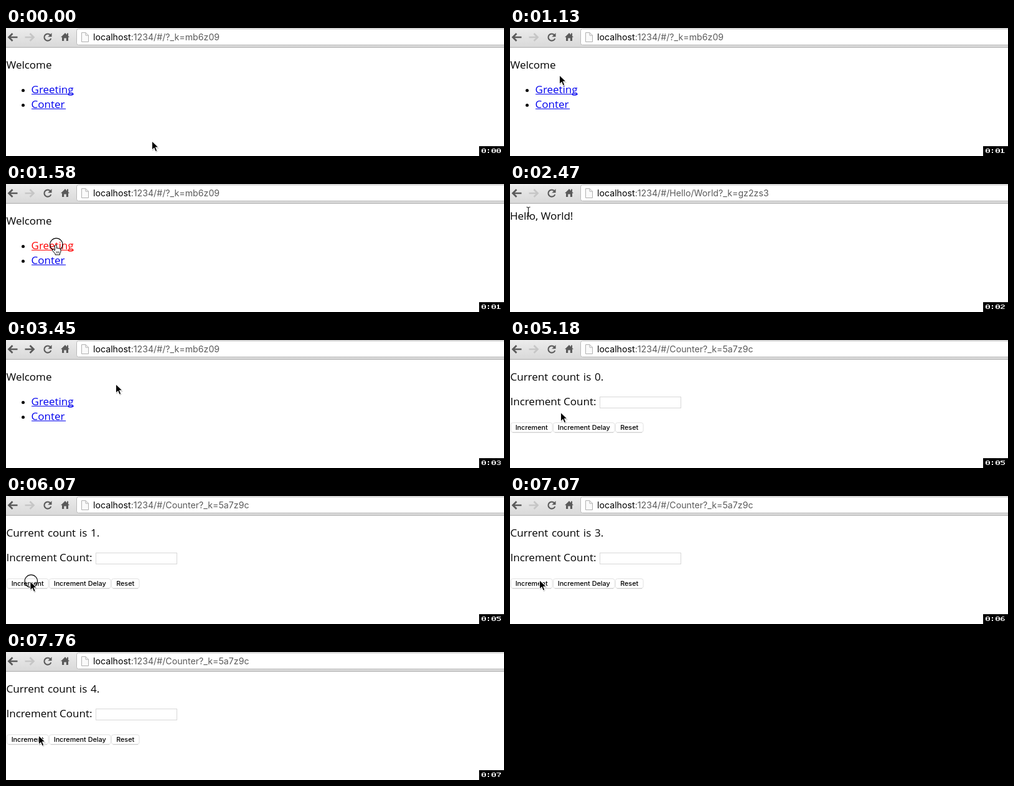
An HTML page that plays this animation: 800x208 px, repeating every 8000 ms.

```html
<!DOCTYPE html>
<html lang="en">
<head>
<meta charset="utf-8">
<title>Router demo</title>
<style>
html, body { margin: 0; width: 100%; height: 100%; overflow: hidden; background: #fff; }
svg { display: block; width: 800px; height: 208px; }
text { white-space: pre; }
.page { font: 17px "Open Sans", "Noto Sans", sans-serif; }
#count { word-spacing: 1.3px; }
.link { fill: #00e; }
.link rect { height: 1px; }
.url { font: 14.2px Inter, "Liberation Sans", sans-serif; fill: #5a5a5a; }
.button text { font: 500 10.8px Inter, "Liberation Sans", sans-serif; text-anchor: middle; }
.button rect { fill: #fff; stroke: #e2e2e2; }
.button.pressed rect { fill: #3b8df5; stroke: #2f78dc; }
.button.pressed text { fill: #fff; }
.icon { fill: none; stroke: #5a5a5a; stroke-width: 2.7; }
.reload { stroke-width: 2.1; }
.digit { fill: none; stroke: #fff; }
</style>
</head>
<body>
<svg viewBox="0 0 800 208">
  <defs>
    <linearGradient id="chrome" x2="0" y2="1">
      <stop stop-color="#ececec"/><stop offset="1" stop-color="#d9d9d9"/>
    </linearGradient>
  </defs>
  <rect width="800" height="208" fill="#fff"/>

  <rect width="800" height="31" fill="url(#chrome)"/>
  <rect y="31" width="800" height="1" fill="#ababab"/>
  <rect x="113.5" y="1.5" width="700" height="26" rx="3" fill="#fff" stroke="#b9b9b9"/>
  <path class="icon" d="M18.5 15H5M10.5 9L4.5 15L10.5 21"/>
  <path class="icon" id="forward" d="M30.5 15H44M38.5 9L44.5 15L38.5 21"/>
  <path class="icon reload" d="M71.3 11.4A5.6 5.6 0 1 0 72.3 17"/>
  <path d="M73.5 8V14.2H67.3Z" fill="#5a5a5a"/>
  <path d="M95 8L102 15H100V21H96.8V16.5H93.2V21H90V15H88L95 8ZM98 8.5H100V13L98 11Z" fill="#5a5a5a"/>
  <path d="M121.5 7.5H128L132.5 12V22.5H121.5ZM128 7.5V12H132.5" fill="#fafafa" stroke="#b0b0b0"/>
  <text class="url" x="140" y="20"><tspan fill="#000">localhost</tspan><tspan id="path"></tspan></text>

  <g class="page">
    <g id="home">
      <text x="0.5" y="66">Welcome</text>
      <circle cx="27.5" cy="101.5" r="2.5"/>
      <circle cx="27.5" cy="125.5" r="2.5"/>
      <g class="link" id="greeting">
        <text x="40.5" y="106">Greeting</text><rect x="41" y="107" width="68"/>
      </g>
      <g class="link" id="conter">
        <text x="40.5" y="130">Conter</text><rect x="41" y="131" width="55"/>
      </g>
    </g>
    <text id="hello" x="0" y="58">Hello, World!</text>
    <g id="counter">
      <text id="count" x="0.5" y="66"></text>
      <text x="0.5" y="106">Increment Count:</text>
      <rect x="144.5" y="92.5" width="130" height="18" fill="#fff" stroke="#d8d8d8"/>
      <g id="buttons"></g>
    </g>
  </g>

  <rect x="760" y="192" width="40" height="16"/>
  <path class="digit" id="minute" transform="translate(764 196)"/>
  <path d="M774 197h2v2h-2zM774 201h2v2h-2z" fill="#fff"/>
  <path class="digit" id="tens" transform="translate(780 196)"/>
  <path class="digit" id="second" transform="translate(788 196)"/>

  <g id="cursor">
    <circle id="ring" r="10.2" cx="0.8" cy="0.3" fill="none" stroke="#000" stroke-width="1.1"/>
    <g id="arrow" transform="translate(-.6 .5) scale(1.06)">
      <path d="M.5 1.5V15.5L3.8 12.5L6 17.5L8.8 16.3L6.6 11.5H11Z" fill="#000" opacity=".25"/>
      <path d="M0 0V14L3.3 11L5.4 16.2L8 15.1L5.8 10H10.3Z" fill="#000" stroke="#fff"/>
    </g>
    <path id="beam" d="M-3-7.5Q0-7.5 0-5.5Q0-7.5 3-7.5M0-5.5V5.5M-3 7.5Q0 7.5 0 5.5Q0 7.5 3 7.5M-1.5 2H1.5" fill="none" stroke="#222" stroke-width="1.2"/>
    <g id="hand" stroke="#000" stroke-linejoin="round">
      <path d="M-1.5 10V1.8Q0 0 1.5 1.8V6.5Q3 5 4 6.8Q5.6 5.7 6.3 7.5Q8 7 8 9V12L6.5 15V17H-1V15.5L-5.5 10Q-6 8-4 8.3Z" fill="#fff"/>
      <path d="M1 11.5V14.5M3 11.5V14.5M5 11.5V14.5" stroke-width=".8"/>
    </g>
  </g>
</svg>
<script>
const LOOP = 8000;
const $ = id => document.getElementById(id);
const show = (id, on) => $(id).setAttribute('display', on ? 'inline' : 'none');
const lastAt = (list, t, time = x => x) => list.findLastIndex(x => time(x) <= t);

const ticks = [0, 590, 740, 890, 1030, 1130, 1280, 1430, 1580, 1730,
  2470, 2620, 2770, 2920, 3060, 3160, 3300, 3450, 3600, 3750, 3900, 4050, 4150, 4300, 4440, 4590, 4740,
  5480, 5630, 5780, 5920, 6070, 6220, 6320, 6470, 6620, 6770, 6920, 7060, 7170, 7320, 7470, 7620, 7760];
const seconds = [0, 1030, 2020, 3060, 4150, 5180, 6220, 7170];
const counts = [0, 6070, 6470, 7060, 7760];
const clicks = [1580, 2920, 4590, 6070, 6470, 6920, 7620];
const presses = [6920, 7620];

// time, x, y, pointer shape
const moves = [
  [0, 235, 183, 'arrow'], [480, 235, 183, 'arrow'], [1130, 80, 76, 'arrow'],
  [1430, 80, 98, 'hand'], [1730, 80, 98, 'arrow'], [2460, 80, 98, 'arrow'],
  [2470, 29.5, 45, 'beam'], [2620, 16, 24, 'arrow'], [2770, 9, 14, 'arrow'],
  [3060, 9, 14, 'arrow'], [3450, 177, 71, 'arrow'], [3600, 174, 72, 'arrow'],
  [4300, 84, 112, 'hand'], [4440, 82, 117, 'hand'], [4740, 82, 117, 'arrow'],
  [5400, 82, 117, 'arrow'], [5920, 39.5, 138, 'arrow'], [6470, 39.5, 138, 'arrow'],
  [7470, 53, 135, 'arrow']
];

// Each stroke is repeated one pixel to the right, so uprights are two wide.
const glyphs = [
  'M1.5 .5H4.5L5.5 1.5V5.5L4.5 6.5H1.5L.5 5.5V1.5ZM2.5 4L3.5 3',
  'M1 1.5H2.5V0V6.5M.5 6.5H5.5',
  'M.5 2V1.5L1.5 .5H4.5L5.5 1.5V2.5L.5 5.5V6.5H5.5',
  'M.5 1.5L1.5 .5H4.5L5.5 1.5V2.5L4.5 3.5H2.5M4.5 3.5L5.5 4.5V5.5L4.5 6.5H1.5L.5 5.5',
  'M4.5 7V.5L.5 4.5H6',
  'M6 .5H.5V2.5H4.5L5.5 3.5V5.5L4.5 6.5H1.5L.5 5.5',
  'M5 .5H2.5L.5 2.5V5.5L1.5 6.5H4.5L5.5 5.5V4.5L4.5 3.5H.5',
  'M0 .5H5.5V2L3 4.5V7'
];
const setDigit = (id, n) =>
  $(id).setAttribute('d', glyphs[n] + glyphs[n].replace(/M([\d.]+)/g, (_, x) => 'M' + (+x + 1))
    .replace(/([HL])([\d.]+)/g, (_, c, x) => c + (+x + 1)).replace(/V([\d.]+)/g, 'V$1'));

$('buttons').innerHTML = [['Increment', 1, 67], ['Increment Delay', 69, 99], ['Reset', 169, 45]]
  .map(([label, x, w]) => `<g class="button">
    <rect x="${x + .5}" y="134.5" width="${w - .5}" height="15.5" rx="3"/>
    <path d="M${x + 3} 150.3h${w - 5}" stroke="#c4c4c4" stroke-width=".8"/>
    <text x="${x + w / 2 + .2}" y="146">${label}</text></g>`).join('');
const increment = $('buttons').firstElementChild;

function pointer(t) {
  const i = lastAt(moves, t, m => m[0]);
  const a = moves[i], b = moves[i + 1] || a;
  const u = b === a ? 0 : (t - a[0]) / (b[0] - a[0]);
  const k = u * u * (3 - 2 * u);
  return { x: a[1] + (b[1] - a[1]) * k, y: a[2] + (b[2] - a[2]) * k, shape: a[3] };
}

function render(t) {
  const tick = ticks[lastAt(ticks, t)];
  const page = t < 1730 ? 'home' : t < 3060 ? 'hello' : t < 4740 ? 'home' : 'counter';
  for (const id of ['home', 'hello', 'counter']) show(id, id === page);
  $('path').textContent = ':1234/#/' +
    { home: '?_k=mb6z09', hello: 'Hello/World?_k=gz2zs3', counter: 'Counter?_k=5a7z9c' }[page];
  $('forward').style.stroke = t >= 3060 && t < 4740 ? '#5a5a5a' : '#c6c6c6';

  $('greeting').style.fill = tick === 1580 ? '#f00' : '';
  $('conter').style.fill = tick === 4590 ? '#f00' : '';
  $('count').textContent = `Current count is ${lastAt(counts, t)}.`;
  increment.classList.toggle('pressed', presses.includes(tick));

  const { x, y, shape } = pointer(tick);
  $('cursor').setAttribute('transform', `translate(${x} ${y})`);
  for (const id of ['arrow', 'beam', 'hand']) show(id, id === shape);
  show('ring', clicks.includes(tick));
  setDigit('second', lastAt(seconds, t));
}

setDigit('minute', 0);
setDigit('tens', 0);
const start = performance.now();
function loop() {
  render((performance.now() - start) % LOOP);
  requestAnimationFrame(loop);
}
loop();
</script>
</body>
</html>
```
